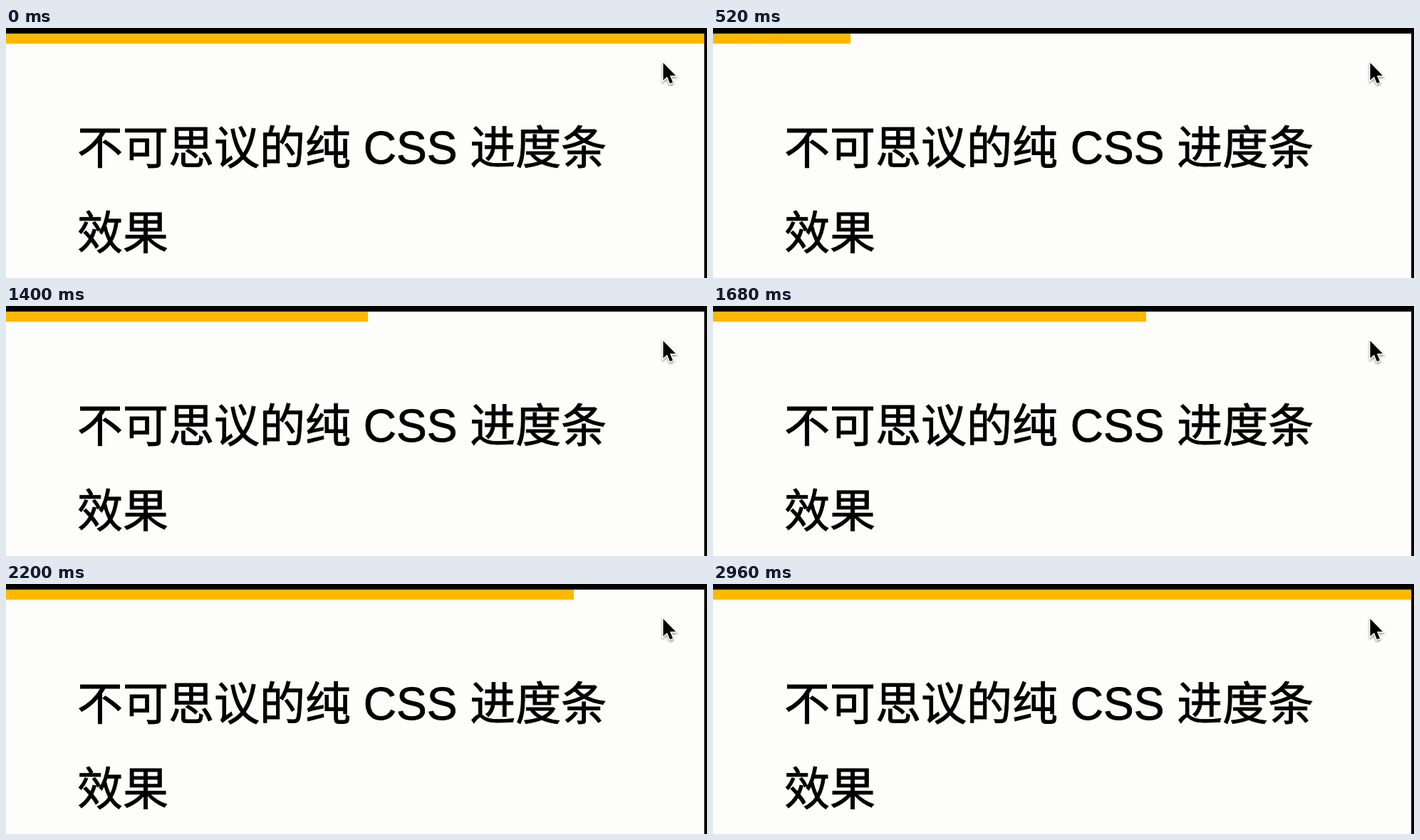
Recreate the animation shown at these times as an HTML page. Size 984x352 px, loop 3 s.

```html
<!DOCTYPE html>
<html lang="zh-CN">
<head>
<meta charset="utf-8">
<title>CSS 进度条</title>
<style>
  html, body { margin: 0; width: 100%; height: 100%; overflow: hidden; background: #fdfdfb; }
  svg { display: block; width: 984px; height: 352px; }
  text {
    font: 64px "Liberation Sans", "Noto Sans CJK SC", "Noto Sans CJK", sans-serif;
    stroke: #000;
    stroke-width: 0.9px;
  }
</style>
</head>
<body>
<svg viewBox="0 0 984 352">
  <defs>
    <filter id="soft" x="-50%" y="-50%" width="200%" height="200%"><feGaussianBlur stdDeviation="1.5"/></filter>
    <path id="arrow" d="M922.500 49V73.500L928 68.500L932 78L936 76.500L932 67H940Z"/>
  </defs>
  <rect width="984" height="352" fill="#fdfdfb"/>
  <rect id="bar" y="8" width="980" height="14" fill="#ffb700"/>
  <path d="M0 0H984V352H980V8H0Z"/>
  <path d="M0 7.500H980.500V352" fill="none" stroke="#26241a"/>
  <text x="100" y="190.500">不可思议的纯 CSS 进度条</text>
  <text x="100" y="310.500">效果</text>
  <use href="#arrow" y="2" stroke="#000" stroke-width="3" opacity="0.4" filter="url(#soft)"/>
  <use href="#arrow" stroke="#fff" stroke-width="3" paint-order="stroke"/>
</svg>
<script>
  const LOOP = 3000, STEP = 40, FULL = 980;
  const bar = document.getElementById('bar');
  // Progress as [time in ms, bar width]
  const progress = [[40, 1], [520, 193], [1040, 368], [1400, 508], [1960, 707], [2480, 901], [2690, FULL]];

  function widthAt(t) {
    if (t < STEP) return FULL;
    const next = progress.findIndex(([time]) => time > t);
    if (next < 0) return FULL;
    const [t0, w0] = progress[next - 1];
    const [t1, w1] = progress[next];
    return Math.round(w0 + (w1 - w0) * (t - t0) / (t1 - t0));
  }

  function render(ms) {
    const t = Math.floor((ms % LOOP) / STEP) * STEP;
    bar.setAttribute('width', widthAt(t));
  }

  const start = performance.now();
  function tick() {
    render(performance.now() - start);
    requestAnimationFrame(tick);
  }
  tick();
</script>
</body>
</html>
```
